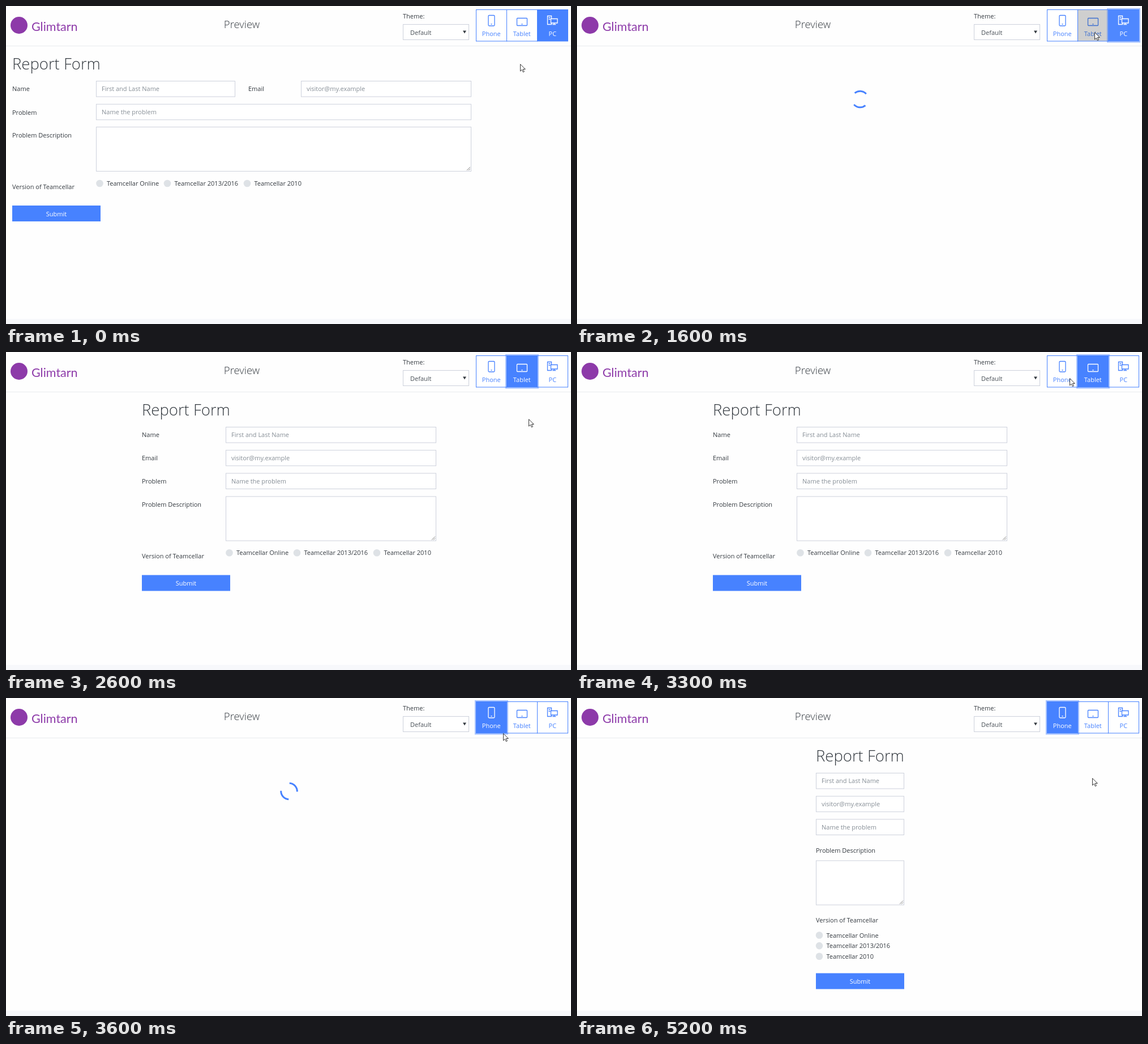
Write an HTML page that moves like this. It is 998 px wide and 561 px high and loops after 5.4 s.

```html
<!DOCTYPE html>
<html lang="en">
<head>
<meta charset="utf-8">
<title>Form preview</title>
<style>
  html, body { margin: 0; width: 100%; height: 100%; overflow: hidden; background: #fefefe; }
  svg { display: block; width: 998px; height: 561px; font: 11px "Open Sans", "Noto Sans", sans-serif; }
  .light { font-weight: 300; }
  .brand { font: 21.5px Lato, sans-serif; }
</style>
</head>
<body>
<svg id="stage" viewBox="0 0 998 561"></svg>
<script>
const LOOP = 5400, STEP = 100;
const BLUE = '#4782ff', INK = '#343a40', HINT = '#868e96', EDGE = '#cdd1dc';

const text = (x, y, str, fill = INK, extra = '') =>
  `<text x="${x}" y="${y}" fill="${fill}" ${extra}>${str}</text>`;
const centred = (x, y, str, fill, extra = '') =>
  text(x, y, str, fill, `text-anchor="middle" ${extra}`);
const rect = (x, y, w, h, fill, stroke = 'none', extra = '') =>
  `<rect x="${x}" y="${y}" width="${w}" height="${h}" fill="${fill}" stroke="${stroke}" ${extra}/>`;
const path = (d, stroke, extra = '') =>
  `<path d="${d}" fill="none" stroke="${stroke}" ${extra}/>`;

// Form parts
const title = x => text(x, 112, 'Report Form', INK, 'class="light" font-size="27.5"');
const input = (x, y, w, hint) =>
  rect(x + .5, y + .5, w - 1, 27.5, '#fff', EDGE) + text(x + 10, y + 18.3, hint, HINT);
const textarea = (x, y, w) => rect(x + .5, y + .5, w - 1, 78, '#fff', EDGE) +
  path(`M${x + w - 8} ${y + 77}l6-6m-3 6l3-3`, '#777', 'stroke-width=".9"');
const radio = (x, y, label) =>
  `<circle cx="${x}" cy="${y}" r="6.3" fill="#dee2e6"/>` + text(x + 12.5, y + 4, label);
const submit = (x, y) => rect(x, y, 156, 28, BLUE) + centred(x + 78, y + 18.5, 'Submit', '#fff');

const HINTS = ['First and Last Name', 'visitor@my.example', 'Name the problem'];
const VERSIONS = ['Online', '2013/2016', '2010'].map(v => 'Teamcellar ' + v);
const versionLabel = 'Version of Teamcellar';
const radioRow = (x, y) => VERSIONS.map((v, i) => radio(x + [0, 119.5, 260.5][i], y, v)).join('');
const inputRows = (x, w) => HINTS.map((h, i) => input(x, 132 + i * 40.75, w, h)).join('');

const forms = {
  pc: title(11) +
    text(11, 150, 'Name') + input(159, 132, 246, HINTS[0]) +
    text(428, 150, 'Email') + input(521, 132, 301, HINTS[1]) +
    text(11, 191.5, 'Problem') + input(159, 172.75, 663, HINTS[2]) +
    text(11, 232, 'Problem Description') + textarea(159, 213, 663) +
    text(11, 322.5, versionLabel) + radioRow(165.5, 313) + submit(11, 352),
  tablet: title(240) +
    ['Name', 'Email', 'Problem', 'Problem Description']
      .map((s, i) => text(240, 150.3 + i * 40.9, s)).join('') +
    inputRows(388, 372) + textarea(388, 254.5, 372) +
    text(240, 363.5, versionLabel) + radioRow(394.5, 354.3) + submit(240, 393.5),
  phone: title(422) + inputRows(422, 156) +
    text(422, 273, 'Problem Description') + textarea(422, 286.5, 156) +
    text(422, 395.5, versionLabel) +
    VERSIONS.map((v, i) => radio(428, 418.5 + i * 18.6, v)).join('') + submit(422, 485.5)
};

const header =
  path('M0 70.5H998', '#e8eaed') + rect(0, 552, 998, 9, '#f7f8fb') +
  '<circle cx="23" cy="34" r="15" fill="#8d3aa9"/>' +
  text(45, 43.5, 'Glimtarn', '#8d3aa9', 'class="brand"') +
  centred(416.5, 39.3, 'Preview', INK, 'class="light" font-size="18.5"') +
  text(701, 22, 'Theme:') + rect(701.5, 32.5, 116, 27, '#fff', EDGE) +
  text(714, 50.7, 'Default', '#495057') + '<path d="M807 43.5h6l-3 5z" fill="#343a40"/>';

// Device buttons
const buttons = [
  { id: 'phone', label: 'Phone', x: 830,
    icon: 'M853.5 16.5h8q1.5 0 1.5 1.5v15.5q0 1.5-1.5 1.5h-8q-1.5 0-1.5-1.5V18q0-1.5 1.5-1.5zM856.5 32h2' },
  { id: 'tablet', label: 'Tablet', x: 884,
    icon: 'M903.5 21.5h16q1 0 1 1v11q0 1-1 1h-16q-1 0-1-1v-11q0-1 1-1zM910.5 32h2' },
  { id: 'pc', label: 'PC', x: 938,
    icon: 'M963.5 22v-4.5h-7v15h7v-3M958.5 20.5h3m-3 3h3M962.5 22.5h11.5v7.5h-11.5zM968.3 30v2.5m-3 0h6' }
];

function button({ id, label, x, icon }, state) {
  const active = id === state.active;
  const pressed = id === state.pressed;
  const fill = pressed ? state.pressFill : active ? state.activeFill || BLUE : '#fff';
  const ink = active ? '#fff' : pressed ? '#3d6fd0' : BLUE;
  const edge = active ? fill : BLUE;
  return rect(x + .5, 6.5, 54, 55.5, fill, edge) + path(icon, ink, 'stroke-width="1.3"') +
    centred(x + 27.3, 52.6, label, ink);
}

function ring(id) {
  const b = buttons.find(b => b.id === id);
  return b ? rect(b.x - 1, 5, 57, 58.5, 'none', BLUE, 'stroke-width="2.2" stroke-opacity=".48"') : '';
}

// Each state holds from its start until the next one
const states = [
  { at: 0, form: 'pc', active: 'pc' },
  { at: 1600, spin: 4, active: 'pc', activeFill: '#4f88ff', ring: 'pc', pressed: 'tablet', pressFill: '#cfcfcf' },
  { at: 1700, spin: 44, active: 'pc', activeFill: '#6197ff', ring: 'pc', pressed: 'tablet', pressFill: '#bcc2d0' },
  { at: 1800, spin: 84, active: 'tablet', ring: 'tablet' },
  { at: 2200, form: 'tablet', active: 'tablet', ring: 'tablet' },
  { at: 3500, spin: 8, active: 'tablet', activeFill: '#6095ff', ring: 'tablet', pressed: 'phone', pressFill: '#bcc2d0' },
  { at: 3600, spin: 48, active: 'phone', ring: 'phone' },
  { at: 4000, form: 'phone', active: 'phone', ring: 'phone' }
];

const spinner = angle =>
  path('M-10.1-10.1A14.3 14.3 0 0 1 10.1-10.1M10.1 10.1A14.3 14.3 0 0 1-10.1 10.1',
    BLUE, `stroke-width="3" transform="translate(500 164.5) rotate(${angle})"`);

// Pointer path: time, x, y
const pointerKeys = [
  [0, 908, 102], [800, 908, 102], [900, 908, 100], [1100, 908, 100], [1500, 914, 46],
  [1700, 914, 46], [2100, 916, 72], [2300, 924, 119], [2500, 924, 119], [2600, 923, 118],
  [2700, 923, 118], [3300, 870, 46], [3500, 870, 46], [4000, 908, 128], [4100, 910, 139],
  [4900, 910, 139], [5200, 910, 141], [LOOP, 910, 141]
];

function pointer(t) {
  const i = pointerKeys.findIndex(k => k[0] > t);
  const [t0, x0, y0] = pointerKeys[i - 1], [t1, x1, y1] = pointerKeys[i];
  const p = (t - t0) / (t1 - t0);
  const x = Math.round(x0 + (x1 - x0) * p), y = Math.round(y0 + (y1 - y0) * p);
  return `<path transform="translate(${x} ${y})" d="M.5 .7v12.3l2.9-2.7 2 4.4 2-.9-2-4.3h3.9z"
    fill="#fff" stroke="#222" stroke-width=".9"/>`;
}

function draw(t) {
  const state = states.findLast(s => s.at <= t);
  const body = state.form ? forms[state.form] : spinner(state.spin + (t - state.at) * .4);
  const order = [...buttons].sort((a, b) => (a.id === state.active) - (b.id === state.active));
  return header + body + order.map(b => button(b, state)).join('') + ring(state.ring) + pointer(t);
}

const stage = document.getElementById('stage');
let shown = -1;
function tick() {
  const t = Math.floor(performance.now() % LOOP / STEP) * STEP;
  if (t !== shown) stage.innerHTML = draw(shown = t);
  requestAnimationFrame(tick);
}
tick();
</script>
</body>
</html>
```
